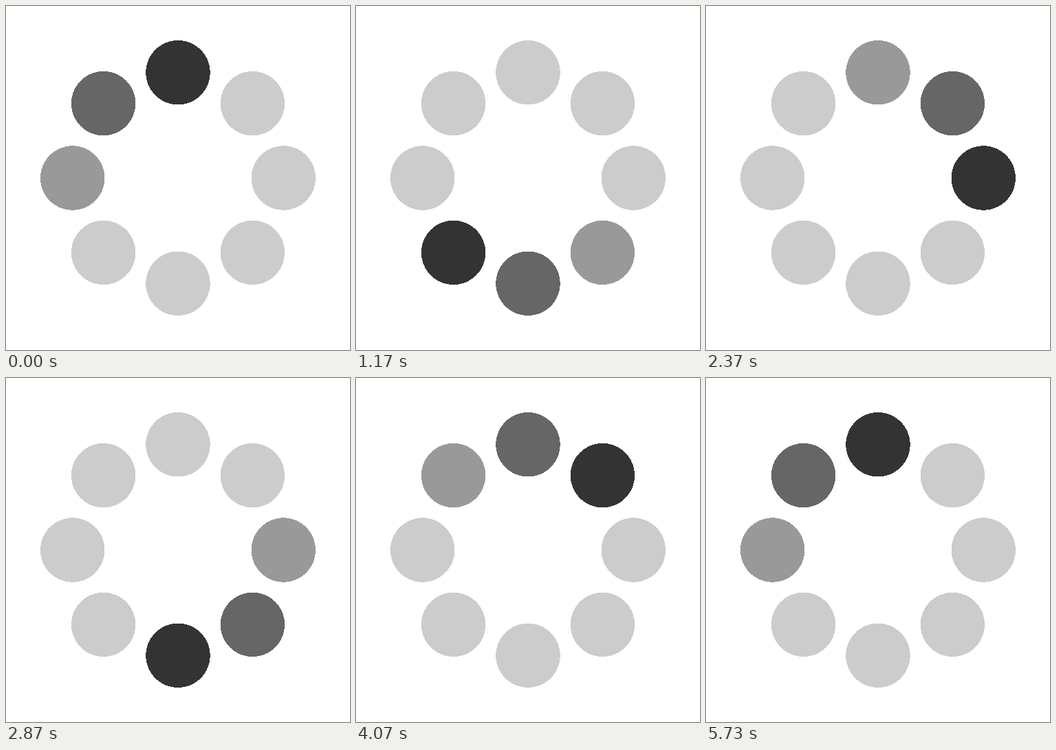
Animation of 500 by 500 pixels, one loop 5.77 s. Source, as an HTML page:

```html
<!DOCTYPE html>
<html lang="en">
<head>
<meta charset="utf-8">
<title>Loading spinner</title>
<style>
  html, body { margin: 0; width: 100%; height: 100%; overflow: hidden; background: #fff; }
  svg { display: block; width: 100%; height: 100%; }
</style>
</head>
<body>
<svg viewBox="0 0 500 500" shape-rendering="crispEdges"></svg>
<script>
const LOOP = 5770;
const COUNT = 8;
const RING = 153.3;
const RADIUS = 46.7;
const TRAIL = ['#333', '#666', '#999'];
const REST = '#ccc';

// Hold times repeat in this rhythm; the loop begins a little way into the first
const HOLDS = [260, 240, 230, 230, 240];
const LEAD = 30;

const svg = document.querySelector('svg');

const dots = Array.from({ length: COUNT }, (_, i) => {
  const angle = i * 2 * Math.PI / COUNT;
  const dot = document.createElementNS(svg.namespaceURI, 'circle');
  dot.setAttribute('cx', 250 + RING * Math.sin(angle));
  dot.setAttribute('cy', 250 - RING * Math.cos(angle));
  dot.setAttribute('r', RADIUS);
  return svg.appendChild(dot);
});

// Number of places the dark dot has moved clockwise
function headAt(time) {
  let head = 0;
  let end = HOLDS[0] - LEAD;
  while (time >= end) {
    head++;
    end += HOLDS[head % HOLDS.length];
  }
  return head % COUNT;
}

function draw(time) {
  const head = headAt(time);
  dots.forEach((dot, i) => {
    const behind = (head - i + COUNT) % COUNT;
    dot.setAttribute('fill', TRAIL[behind] || REST);
  });
}

const start = performance.now();

function tick() {
  draw((performance.now() - start) % LOOP);
  requestAnimationFrame(tick);
}

tick();
</script>
</body>
</html>
```
